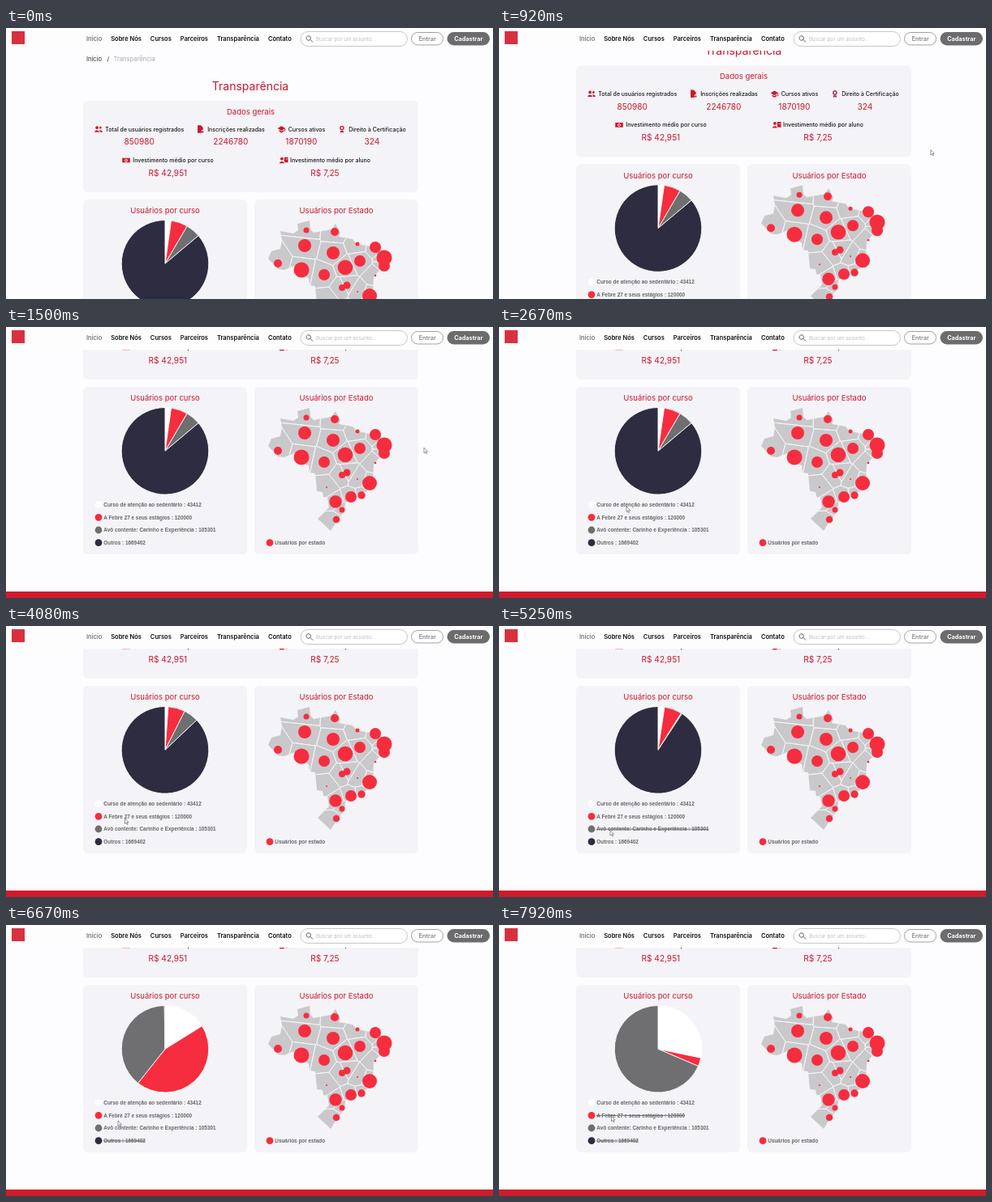
Animation of 600 by 335 pixels, one loop 8000 ms. Source, as an HTML page:

```html
<!DOCTYPE html>
<html lang="pt-BR">
<head>
<meta charset="utf-8">
<title>Transparência</title>
<style>
  html, body { margin: 0; width: 100%; height: 100%; overflow: hidden; background: #fdfcfe; }
  svg { display: block; width: 100%; height: 100%; }
  text { font-family: Inter, "Open Sans", sans-serif; }
  .legend { font: bold 6.4px "Liberation Sans", Arial, sans-serif; fill: #666; }
  .red { fill: #c8182d; text-anchor: middle; }
  .icon { fill: #c8182d; fill-rule: evenodd; }
  .state { fill: none; stroke: #f8f7fa; stroke-width: .8; }
</style>
</head>
<body>
<svg viewBox="0 0 600 335">
  <clipPath id="country">
    <path d="M374 100L375 111 379 115 401 111 406 104 412 115 410 120 427 123 432 129 455 133 466 139 468 146 467 153 453 170 452 186 445 203 432 207 418 217 417 228 408 239 400 252 384 237 398 223 396 211 391 210 390 204 383 203 381 181 374 180 373 171 358 166 355 156 343 161 335 160 323 147 327 138 338 135 340 124 338 113 354 116 360 112 359 104Z"/>
  </clipPath>
  <g id="page">
    <g fill="#f4f3f7">
      <rect x="95" y="90" width="413" height="113" rx="6"/>
      <rect x="95" y="212" width="202" height="207" rx="6"/>
      <rect x="306" y="212" width="202" height="207" rx="6"/>
    </g>
    <rect y="465" width="600" height="60" fill="#cf1c2c"/>
    <g id="labels"></g>
    <g transform="translate(0 138)">
      <g id="map" clip-path="url(#country)"><rect x="320" y="95" width="160" height="165" fill="#c9c9cb"/></g>
      <g id="dots" fill="#f62d3e"></g>
      <g id="pie" stroke="#fff" stroke-width=".9" stroke-linejoin="bevel"></g>
      <g id="legend"></g>
    </g>
  </g>
  <g id="header">
    <rect width="600" height="28" fill="#fefdfe"/>
    <rect x="7" y="4" width="16" height="16" fill="#d9303f"/>
    <rect x="363" y="4.5" width="131.5" height="18" rx="9" fill="#fff" stroke="#b9b8bb" stroke-width=".8"/>
    <path d="M370 12.500a2.700 2.700 0 1 1 0 .1M375 14.500l3 3" fill="none" stroke="#555"/>
    <rect x="499.5" y="5.5" width="39" height="15.5" rx="7.7" fill="#fff" stroke="#8a898c" stroke-width=".8"/>
    <rect x="543.5" y="5" width="52.5" height="16.5" rx="8.2" fill="#6c6b6d"/>
  </g>
  <path id="cursor" d="M0 0v6.500l1.500-1.400 1.100 2.400 1-.5-1.100-2.300h2z" fill="#fff" stroke="#555" stroke-width=".6"/>
</svg>
<script>
const NS = 'http://www.w3.org/2000/svg', $ = id => document.getElementById(id);

function add(parent, tag, attrs, text) {
  const el = document.createElementNS(NS, tag);
  for (const k in attrs) el.setAttribute(k, attrs[k]);
  if (text) el.textContent = text;
  $(parent).append(el);
  return el;
}
const label = (parent, text, x, y, size, attrs) =>
  add(parent, 'text', { x, y, 'font-size': size, ...attrs }, text);
const red = (text, x, y, size) => label('labels', text, x, y, size, { class: 'red' });

// header
let navX = 99;
for (const name of ['Início', 'Sobre Nós', 'Cursos', 'Parceiros', 'Transparência', 'Contato']) {
  const style = navX === 99 ? { fill: '#666', 'font-weight': 500 } : { fill: '#111', 'font-weight': 600 };
  navX += label('header', name, navX, 16.3, 7.5, style).getComputedTextLength() + 11;
}
label('header', 'Buscar por um assunto...', 382, 16, 6.3, { fill: '#bdbcc0' });
label('header', 'Entrar', 519.2, 16.2, 7.3, { fill: '#777', 'font-weight': 500, 'text-anchor': 'middle' });
label('header', 'Cadastrar', 569.8, 16, 7.3, { fill: '#fff', 'font-weight': 700, 'text-anchor': 'middle' });

// headings
label('labels', 'Início', 99, 41, 7.6, { fill: '#333' });
label('labels', '/', 124.5, 41, 7.6, { fill: '#333' });
label('labels', 'Transparência', 132.5, 41, 7.6, { fill: '#aaa9ad' });
red('Transparência', 301, 77, 14);
red('Dados gerais', 301.5, 106.5, 9.5);
red('Usuários por curso', 196, 229.3, 9.5);
red('Usuários por Estado', 407, 229.3, 9.5);

// each figure sits centred under its icon and label
function statRow(x, y, gap, stats) {
  for (const [name, value, icon] of stats) {
    add('labels', 'path', { d: icon, class: 'icon', transform: `translate(${x + 5} ${y}) scale(.95)` });
    const text = label('labels', name, x + 13.3, y + 2.6, 7, { fill: '#151515', 'font-weight': 500 });
    const width = 13.3 + text.getComputedTextLength();
    red(value, x + width / 2, y + 19.3, 10.1);
    x += width + gap;
  }
}
statRow(109, 125, 15.5, [
  ['Total de usuários registrados', '850980', 'M-4-2a2 2 0 1 1 0 .1zM-5 4v-1q3-3 6 0v1zM1-2a1.500 1.500 0 1 1 0 .1zM2 4q0-2-1-3 3 0 4 2v1z'],
  ['Inscrições realizadas', '2246780', 'M-4-5h4l3 3v3h-2v4h-5zM2 2h1v1h1v1h-1v1h-1v-1h-1v-1h1z'],
  ['Cursos ativos', '1870190', 'M-5-1L0-4 5-1 0 2zM-3 1L0 3 3 1v2L0 5-3 3zM4-1h1v4h-1z'],
  ['Direito à Certificação', '324', 'M-3-1.500a3 3 0 1 1 0 .1zM-1.500-1.500a1.500 1.500 0 1 1 0 .1zM-2 2h4v3L0 4-2 5z']
]);
statRow(143, 163.5, 81, [
  ['Investimento médio por curso', 'R$ 42,951', 'M-5-3H5V3H-5zM-2 0a2 2 0 1 1 0 .1zM-1 0a1 1 0 1 1 0 .1z'],
  ['Investimento médio por aluno', 'R$ 7,25', 'M-4-2a2 2 0 1 1 0 .1zM-5 4v-1q3-3 6 0v1zM1-4h5v7h-4l-1-2zM3-2h2v1h-2z']
]);

// bubbles: x, y, radius; borders run halfway between neighbouring bubbles
const dots = [
  [370, 112, 3.5], [405, 114, 5], [368, 131, 8], [403, 140, 8], [433, 129, 2.5], [455, 133, 7],
  [436, 150, 7], [466, 146, 9.5], [466, 156, 7], [418, 158, 9.3], [392, 167, 7], [364, 161, 9.5],
  [335, 153, 5], [455, 168, 1.3], [433, 188, 1], [448, 193, 9], [420, 180, 4.5], [414, 183, 4],
  [395, 198, 1], [425, 210, 7], [438, 208, 4.7], [406, 216, 7.7], [414, 226, 3.5], [407, 238, 4.3]
];
const distance = (p, q) => (p[0] - q[0]) ** 2 + (p[1] - q[1]) ** 2;
const mix = (p, q, f) => p.map((v, i) => v + (q[i] - v) * f);

function cell(dot) {
  let poly = [[320, 95], [480, 95], [480, 260], [320, 260]];
  for (const other of dots) {
    if (other === dot) continue;
    const side = p => distance(p, dot) - distance(p, other);
    poly = poly.flatMap((p, i) => {
      const q = poly[(i + 1) % poly.length], a = side(p), b = side(q);
      return [...(a <= 0 ? [p] : []), ...(a * b < 0 ? [mix(p, q, a / (a - b))] : [])];
    });
  }
  return poly;
}
for (const dot of dots) {
  const [cx, cy, r] = dot;
  add('map', 'polygon', { points: cell(dot).join(' '), class: 'state' });
  add('dots', 'circle', { cx, cy, r });
}

// legends
const courses = [
  ['Curso de atenção ao sedentário', 43412, '#fff'],
  ['A Febre 27 e seus estágios', 120000, '#f62d3e'],
  ['Avô contente: Carinho e Experiência', 105301, '#6f6e70'],
  ['Outros', 1669402, '#2e2c40']
];
const rowY = i => 219.6 + i * 15.7;
function legend(text, x, y, fill) {
  add('legend', 'circle', { cx: x, cy: y, r: 4.4, fill });
  return label('legend', text, x + 6.3, y + 2.2, 6.4, { class: 'legend' });
}
legend('Usuários por estado', 325, rowY(3), '#f62d3e');
const items = courses.map(([name, count, fill], i) => {
  const width = legend(`${name} : ${count}`, 114, rowY(i), fill).getComputedTextLength();
  const strike = add('legend', 'path', { d: `M120 ${rowY(i) + .2}h${width}`, stroke: '#666', 'stroke-width': .9 });
  return { strike, slice: add('pie', 'path', { fill }) };
});

// legend clicks: time, row toggled
const clicks = [[2830, 0], [3915, 0], [4750, 2], [5400, 2], [5900, 3], [7437, 1]];
const progress = (t, start, length) => Math.max(0, Math.min(1, (t - start) / length));

function shares(hidden) {
  const counts = courses.map((c, i) => hidden[i] ? 0 : c[1]);
  const sum = counts.reduce((a, b) => a + b);
  return counts.map(n => n / sum);
}
function rim(turn) {
  const a = turn * 2 * Math.PI;
  return `${196 + 53.8 * Math.sin(a)} ${153.3 - 53.8 * Math.cos(a)}`;
}
function drawPie(t) {
  const hidden = [];
  let parts = shares(hidden);
  clicks.forEach(([start, row], i) => {
    if (t < start) return;
    hidden[row] = !hidden[row];
    const end = Math.min(t, clicks[i + 1]?.[0] ?? t);
    parts = mix(parts, shares(hidden), 1 - (1 - progress(end, start, 1000)) ** 4);
  });
  let from = 0;
  items.forEach(({ slice, strike }, i) => {
    const to = from + parts[i];
    slice.setAttribute('d', parts[i] < 1e-4 ? '' :
      `M196 153.3L${rim(from)}A53.8 53.8 0 ${+(parts[i] > .5)} 1 ${rim(to)}Z`);
    strike.style.display = hidden[i] ? '' : 'none';
    from = to;
  });
}

// pointer moves: start, length, x, y
const moves = [
  [420, 580, 523.5, 147.5], [1480, 900, 157, 222], [3840, 460, 137, rowY(2) + 1.5],
  [5420, 330, 137, rowY(3)], [6150, 250, 138, 242], [6750, 550, 138.5, rowY(1) + 1]
];
const pointer = t => moves.reduce((at, [start, length, ...to]) => mix(at, to, progress(t, start, length)), [585, 170]);

function frame(now) {
  const t = now % 8000;
  $('page').setAttribute('transform', `translate(0 ${-138 * progress(t, 650, 680) ** 1.25})`);
  $('cursor').setAttribute('transform', `translate(${pointer(t)})`);
  $('cursor').style.display = t < moves[0][0] ? 'none' : '';
  drawPie(t);
  requestAnimationFrame(frame);
}
frame(0);
</script>
</body>
</html>
```
